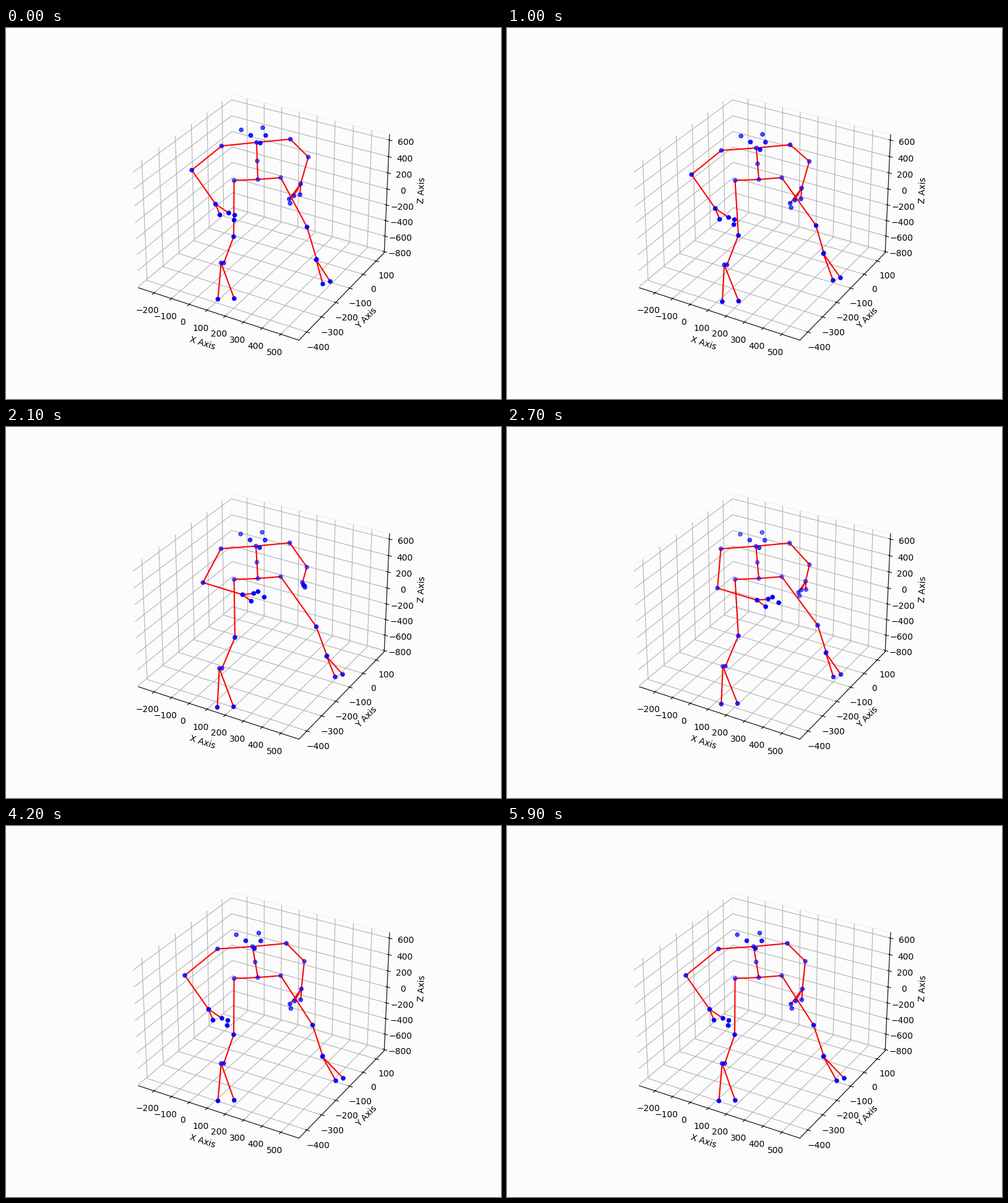
A matplotlib script that plays this animation: 800 by 600 pixels, repeating every 6 s.

```python
import numpy as np
import matplotlib.pyplot as plt
from matplotlib.animation import FuncAnimation
from matplotlib.collections import LineCollection
from matplotlib.colors import to_rgba

W, H, DPI = 800, 600, 100
FRAMES, INTERVAL = 60, 100
PAPER = "#fcfcfc"

# Fixed joints, in stage pixels.
PELVIS, HIP_R, HIP_L = np.array([(407, 245), (368.6, 246.6), (444, 242)])

# Hand shapes relative to the wrist: thumb, little finger, two tips.
HANGING = np.array([(21.5, 14.5), (7, 17.5), (31, 18), (30, 26)])
REACHING = np.array([(18, -2), (14, 10.5), (25, -5), (35, 4)])
OPEN = np.array([(-11, 19.5), (-1, 17.5), (-18.5, 24.5), (-17, 31.5)])
CLOSED = np.array([(2, 3), (4, 5), (3, 4), (5, 7)])

# Left knee, ankle, heel and toes at the height of the kick.
KICK = np.array([(499, 319), (454, 327), (454, 334), (452, 394), (473, 390)])

# Joint order: torso and head 0-11, right arm 12-17, left arm 18-23,
# right leg 24-28, left leg 29-33.
CHAINS = [(1, 0, 2), (0, 3, 4), (10, 4, 11),
          (10, 12, 13, 14), (13, 15),
          (11, 18, 19, 20), (19, 21), (19, 22),
          (1, 24, 25, 26, 27), (26, 28),
          (2, 29, 30, 31, 32), (31, 33)]
BONES = [pair for chain in CHAINS for pair in zip(chain, chain[1:])]

# Opacity by body part; nearer parts are more opaque.
SHADE = np.array([.58] * 4 + [.65] + [.95, .9, .85] + [.7] * 4
                 + [.8] + [1] * 5 + [.6] + [.7] * 5
                 + [.95, .7, .7, 1, 1] + [.9, .75, .75, .9, .9])
HAND_R = slice(13, 18)


def pulse(n, peak, half):
    """Smooth bump of height 1 around a peak."""
    return np.cos(np.pi / 2 * min(1, abs(n - peak) / half)) ** 2


def ease(n, start, stop):
    u = np.clip((n - start) / (stop - start), 0, 1)
    return u * u * (3 - 2 * u)


def mix(a, b, t):
    return a + (b - a) * t


def bone(start, degrees, length):
    a = np.radians(degrees)
    return start + length * np.array([np.cos(a), np.sin(a)])


def shifted(base, *moves):
    """Add each (vector, amount) to a resting place."""
    return np.array(base) + sum(np.array(v) * amount for v, amount in moves)


def upper_body(lift, crouch, bend, drift):
    neck = shifted((403, 195), ((2, -10), lift), ((1, -2.5), crouch),
                   ((0, -2), bend), ((-4.5, 0), drift))
    rise = 0.2 * (195 - neck[1])
    turn = 1 - 3 * drift
    head = [(5 + turn, 3 - rise),
            (-10 + turn / 2, -9.4 - rise), (14.3 + turn / 2, -9.2 - rise),
            (-25.3 + turn / 2, -19.2 - rise / 2), (10, -21.8 - rise)]
    shoulders = [(-56.6, 3.8 + rise), (54.6, -5.2)]
    return np.vstack([PELVIS, HIP_R, HIP_L, (neck + PELVIS) / 2, neck,
                      neck + head, neck + shoulders])


def right_arm(shoulder, reach, drift):
    fold = min(1, 2 * reach)
    elbow = bone(shoulder, 141 - 46 * reach, 62 + 6 * drift)
    wrist = bone(elbow, 55 - 38 * fold, 67)
    return np.vstack([elbow, wrist, wrist + mix(HANGING, REACHING, fold)])


def left_arm(shoulder, crouch, bend, drift):
    fold = min(1, 1.6 * crouch)
    elbow = bone(shoulder, 45 + 10 * crouch - 8 * bend, 41 + 7 * fold)
    wrist = bone(elbow, 106 - 10 * drift, 45 - 19 * fold)
    return np.vstack([elbow, wrist, wrist + mix(OPEN, CLOSED, crouch ** 2)])


def right_leg(lift, crouch, bend):
    knee = shifted((368, 337.5), ((12, -4), bend), ((2, 3), crouch))
    ankle = shifted((352, 384), ((0, -4), lift), ((7, -2), bend),
                    ((-3, 6.5), crouch))
    toe = shifted((342.5, 444.5), ((0, -6), lift), ((11, -4), bend),
                  ((-1, 9), crouch))
    return np.array([knee, ankle, ankle + (-4.3, 0), toe, toe + (26.3, -0.9)])


def left_leg(lift, crouch, bend, kick):
    knee = shifted((495.5, 322), ((-9, 0), lift), ((8, -5), bend),
                   ((6, 1), crouch))
    ankle = shifted((512, 372), ((-10, 2), lift), ((0, -16), bend),
                    ((7, -2), crouch))
    toe = shifted((533, 412), ((-21, 2), lift), ((-12, -8), bend),
                  ((-1, -8), crouch))
    leg = np.array([knee, ankle, ankle + (-0.7, 1), toe, toe + (12, -4)])
    return mix(leg, KICK, kick)


def pose(n):
    """Joint places and colours at frame n."""
    lift = pulse(n, 0, 8)
    crouch = pulse(n, 22, 11)
    reach = pulse(n, 17.5, 7) + pulse(n, 27, 3.5)
    kick = pulse(n, 49, 4)
    bend = 0.5 * pulse(n, 10, 8) + 0.4 * pulse(n, 27, 5) + pulse(n, 49, 6)
    drift = ease(n, 22, 36)

    body = upper_body(lift, crouch, bend, drift)
    joints = np.vstack([body,
                        right_arm(body[10], reach, drift),
                        left_arm(body[11], crouch, bend, drift),
                        right_leg(lift, crouch, bend),
                        left_leg(lift, crouch, bend, kick)])

    colors = np.tile(to_rgba("blue"), (len(joints), 1))
    colors[:, 3] = SHADE * (1 - 0.2 * reach)
    colors[HAND_R, 3] = 1
    colors[-4:, 3] -= 0.2 * kick
    return joints, colors


fig = plt.figure(figsize=(W / DPI, H / DPI), dpi=DPI, facecolor=PAPER)

box = fig.add_subplot(projection="3d", facecolor=PAPER)
box.set(xlim=(-291, 595), ylim=(-453, 163.5), zlim=(-815, 665),
        xticks=range(-200, 501, 100), yticks=range(-400, 101, 100),
        zticks=range(-800, 601, 200),
        xlabel="X Axis", ylabel="Y Axis", zlabel="Z Axis")
for axis in (box.xaxis, box.yaxis, box.zaxis):
    axis.pane.set_facecolor("none")

# Flat layer in stage pixels for the projected figure.
stage = fig.add_axes([0, 0, 1, 1])
stage.set(xlim=(0, W), ylim=(H, 0))
stage.axis("off")
bones = LineCollection([], colors="red", linewidths=1.5, capstyle="projecting", zorder=2)
stage.add_collection(bones)
dots = stage.scatter(*pose(0)[0].T, s=20, c="blue", zorder=3)


def draw(n):
    joints, colors = pose(n)
    bones.set_segments([joints[list(pair)] for pair in BONES])
    dots.set_offsets(joints)
    dots.set_facecolor(colors)
    dots.set_edgecolor(colors)
    return bones, dots


anim = FuncAnimation(fig, draw, frames=FRAMES, interval=INTERVAL, repeat=True)
plt.show()
```
